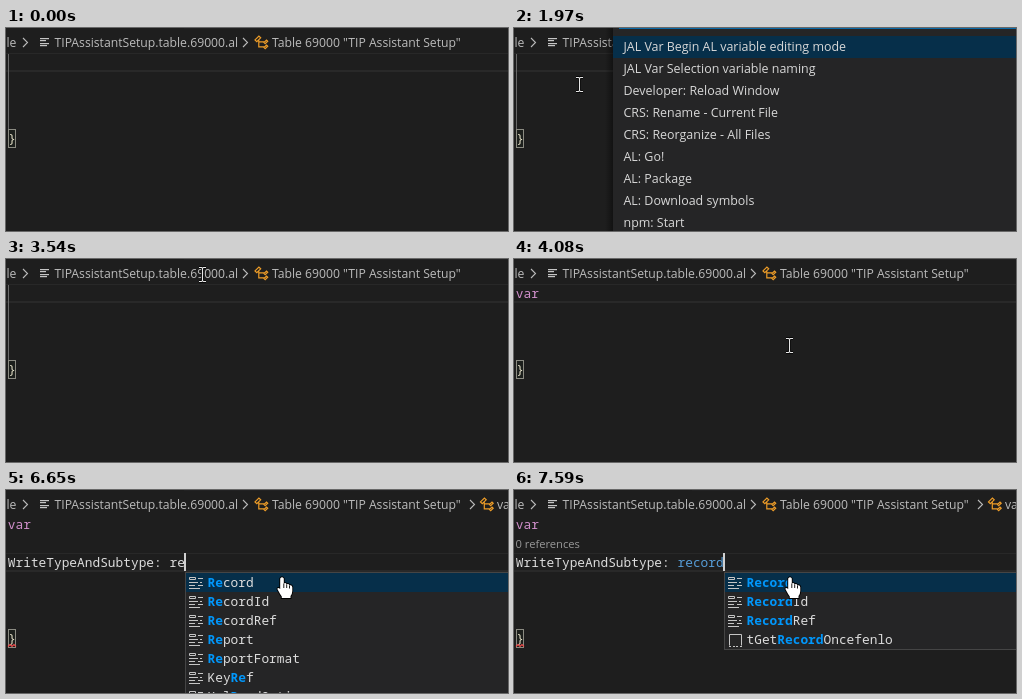
An HTML page with a canvas that plays this animation: 502x203 px, repeating every 8 s.

```html
<!DOCTYPE html>
<html lang="en">
<head>
<meta charset="utf-8">
<title>Editor: declaring a variable</title>
<style>
  html, body { margin: 0; width: 502px; height: 203px; overflow: hidden; background: #1e1e1e; }
  canvas { display: block; }
</style>
</head>
<body>
<canvas id="stage" width="502" height="203"></canvas>
<script>
const W = 502, H = 203, LOOP = 8000;
const ctx = document.getElementById('stage').getContext('2d');

const UI = '"Open Sans", "Noto Sans", sans-serif';
const CODE = '12.83px "Noto Sans Mono", "DejaVu Sans Mono", monospace';
const CHAR = 7.7, LEFT = 1.8, ROW = 19, TOP = 25;

const COMMANDS = [
  'JAL Var Begin AL variable editing mode', 'JAL Var Selection variable naming',
  'Developer: Reload Window', 'CRS: Rename - Current File',
  'CRS: Reorganize - All Files', 'AL: Go!', 'AL: Package',
  'AL: Download symbols', 'npm: Start'
];

// Matched letters stand in brackets, * marks a snippet.
const SUGGEST = {
  re: ['[Re]cord', '[Re]cordId', '[Re]cordRef', '[Re]port', '[Re]portFormat', 'Key[Re]f', 'Xml[Re]adOptions'],
  rec: ['[Rec]ord', '[Rec]ordId', '[Rec]ordRef', '*tGet[Rec]ordOncefenlo', 'XmlP[r]oc[e]ssingInstru[c]tion'],
  reco: ['[Reco]rd', '[Reco]rdId', '[Reco]rdRef', '*tGet[Reco]rdOncefenlo', 'XmlP[r]oc[e]ssingInstru[c]ti[o]n'],
  recor: ['[Recor]d', '[Recor]dId', '[Recor]dRef', '*tGet[Recor]dOncefenlo'],
  record: ['[Record]', '[Record]Id', '[Record]Ref', '*tGet[Record]Oncefenlo']
};

// Pointer path: time, x, y
const PATH = [
  [490, 230, -10], [760, 150, 60], [960, 90, 74], [1230, 29, 48], [1730, 29, 48],
  [2200, 118, 70], [2370, 288, 52], [2530, 210, 9], [2750, 210, 9],
  [2960, 203, 18], [3130, 203, 18], [3290, 197, 16], [3760, 197, 16], [4000, 276, 87]
];

const TYPED = [[6490, 'r'], [6570, 're'], [6950, 'rec'], [7200, 'reco'], [7370, 'recor'], [7590, 'record']];
const POPUP = [[6650, 're'], [7030, 'rec'], [7200, 'reco'], [7370, 'recor'], [7590, 'record']];
const CARET_FLIPS = [500, 1030, 1560, 3470, 3620, 4080, 4630, 5650, 6110];

const latest = (steps, t) => steps.reduce((v, [at, s]) => t >= at ? s : v, '');
const rowY = i => TOP + i * ROW;

function text(s, x, y, color, font) {
  ctx.font = font;
  ctx.fillStyle = color;
  ctx.fillText(s, x, y);
}

function rect(x, y, w, h, color) {
  ctx.fillStyle = color;
  ctx.fillRect(x, y, w, h);
}

function stroke(d, x, y, color, width) {
  ctx.save();
  ctx.translate(x, y);
  ctx.strokeStyle = color;
  ctx.lineWidth = width;
  ctx.stroke(new Path2D(d));
  ctx.restore();
}

const chevron = x => stroke('M0 0 L4.5 4.5 L0 9', x, 10, '#bababa', 1.1);

function classIcon(x) {
  stroke('M1.5 5.4 L5.4 1.5 L7.2 3.3 L3.3 7.2 Z M5.3 5.8 V12.3 H10.7 M5.3 7.3 H10.7' +
    'M10.5 8 L13 5.6 L14.2 6.8 L11.7 9.2 Z M10.5 13 L13 10.6 L14.2 11.8 L11.7 14.2 Z',
    x, 6.5, '#ee9d28', 1.2);
}

function breadcrumbs(t) {
  const font = '12.2px ' + UI, gray = '#bcbcbc';
  rect(178, 0, W - 178, 1, '#222223');
  text('le', 0.5, 19, gray, font);
  chevron(17);
  [[10, 9], [12, 6], [15, 9], [17, 7]].forEach(([y, w]) => rect(34, y, w, 1.2, '#c5c5c5'));
  text('TIPAssistantSetup.table.69000.al', 48.5, 19, gray, font);
  chevron(237);
  classIcon(247.5);
  text('Table 69000 "TIP Assistant Setup"', 266, 19, gray, font);
  if (t >= 4480) {
    chevron(464);
    classIcon(473);
    text('var', 491, 19, gray, font);
  }
}

function brace(y, error) {
  rect(2, y + 1, 8, 18, 'rgba(0,60,0,.06)');
  ctx.strokeStyle = '#8b8b82';
  ctx.lineWidth = 1;
  ctx.strokeRect(2.5, y + 0.5, 7, 18);
  text('}', LEFT + 0.4, y + 14, '#e0dcc4', CODE);
  if (error) stroke('M0 2 L2 0 L4 2 L6 0 L8 2', 2, y + 15.5, '#f14c4c', 1.1);
}

function editor(t) {
  const line = t < 5090 ? 0 : t < 5420 ? 1 : 2;
  const y = rowY(line);
  const typed = latest(TYPED, t);
  let column = 0;

  rect(0, y, W, 1, '#282828');
  rect(0, y + ROW - 2, W, 2, '#292929');
  if (t < 3620) rect(2, TOP + 1, 1, 75, '#6a6a6a');
  else {
    text('var', LEFT, TOP + 14, '#d08fcb', CODE);
    if (!line) column = 3;
  }
  if (t >= 5170) {
    text('WriteTypeAndSubtype:', LEFT, y + 14, '#dcdcdc', CODE);
    column = 21 + typed.length;
    text(typed, LEFT + 21 * CHAR, y + 14, typed === 'record' ? '#569cd6' : '#dcdcdc', CODE);
  }
  if (t >= 6880) text('0 references', 1.5, 58, '#999', '11.2px ' + UI);
  brace(rowY(4 + line), t >= 6190);

  const palette = t >= 1960 && t < 3470;
  const on = CARET_FLIPS.filter(f => t >= f).length % 2;
  const caret = LEFT + column * CHAR;
  if (on && !palette) rect(Math.max(2, Math.floor(caret)), y, 2, ROW - 1, '#d0d0d0');
  return caret;
}

function palette() {
  const shade = ctx.createLinearGradient(91, 0, 99, 0);
  shade.addColorStop(0, 'rgba(0,0,0,0)');
  shade.addColorStop(1, 'rgba(0,0,0,.4)');
  rect(91, 0, 8, H, shade);
  rect(99, 0, W - 99, H, '#252526');
  rect(105, 0, W - 105, 1, '#0a6aa8');
  rect(99, 8, W - 99, 22, '#062f4a');
  COMMANDS.forEach((s, i) => text(s, 109.5, 23 + 22 * i, '#d8d8d8', '12.45px ' + UI));
}

function itemIcon(x, y, snippet) {
  if (snippet) {
    stroke('M2.5 13.5 V2.5 H14.5 V13.5 M2 14.5 H4 M6 14.5 H8 M9 14.5 H11 M13 14.5 H15', x, y, '#c5c5c5', 1);
    return;
  }
  [[10, 3, 5], [1, 7, 9], [12, 7, 2], [1, 10, 6], [10, 10, 5], [1, 13, 11]]
    .forEach(([dx, dy, w]) => rect(x + dx, y + dy, w, 1, '#c5c5c5'));
  stroke('M1.5 2.5 H7.5 V4.5 H1.5 Z', x, y, '#c5c5c5', 1);
}

function suggestions(items, caret) {
  const x = Math.round(caret + 1.2), y = 83, h = items.length * ROW;
  rect(x - 1, y - 1, W - x + 1, h + 2, '#454545');
  rect(x, y, W - x, h, '#252526');
  rect(x, y, W - x, ROW, '#062f4a');
  items.forEach((item, i) => {
    const top = y + i * ROW, snippet = item[0] === '*';
    let at = x + 21.5;
    itemIcon(x + 2, top + 2, snippet);
    item.replace('*', '').split(/[\[\]]/).forEach((part, k) => {
      text(part, at, top + 14, k % 2 ? '#0097fb' : '#dcdcdc', (k % 2 ? 'bold ' : '') + CODE);
      at += part.length * CHAR;
    });
  });
}

function pointerAt(t) {
  const next = PATH.findIndex(p => p[0] > t);
  if (next < 0) return PATH[PATH.length - 1].slice(1);
  if (!next) return null;
  const [t0, x0, y0] = PATH[next - 1], [t1, x1, y1] = PATH[next];
  const k = (t - t0) / (t1 - t0);
  return [x0 + (x1 - x0) * k, y0 + (y1 - y0) * k];
}

function hand(x, y) {
  ctx.save();
  ctx.translate(x, y);
  const shape = new Path2D('M-1.8 1.5 Q0 -1.2 1.8 1.5 V6.5 Q3.6 5.3 4.6 7.2 Q6.6 6.2 7.5 8.3' +
    'Q10 7.6 10.3 10.2 V14 Q10.2 17 8.5 19 V21 H-.2 V19.5 Q-1.8 17.5 -3 15 L-4.6 12' +
    'Q-4.4 9.8 -1.8 12 Z');
  ctx.lineWidth = 1.8;
  ctx.strokeStyle = '#000';
  ctx.stroke(shape);
  ctx.fillStyle = '#fff';
  ctx.fill(shape);
  ctx.lineWidth = 0.9;
  ctx.stroke(new Path2D('M1.8 6.5 V11 M4.7 7.3 V11 M7.5 8.4 V11.5'));
  ctx.restore();
}

function beam(x, y) {
  const d = 'M-3.5 -7 H-1 L0 -6.3 L1 -7 H3.5 M0 -6.3 V6.3 M-3.5 7 H-1 L0 6.3 L1 7 H3.5';
  const px = Math.round(x) - 0.5, py = Math.round(y) - 0.5;
  stroke(d, px, py, '#000', 2.6);
  stroke(d, px, py, '#e8e8e8', 1.1);
}

function draw(t) {
  rect(0, 0, W, H, '#1e1e1e');
  breadcrumbs(t);
  const caret = editor(t);
  const open = t >= 1960 && t < 3470;
  if (open) palette();
  const key = latest(POPUP, t);
  if (key) suggestions(SUGGEST[key], key === 're' ? LEFT + 23 * CHAR : caret);

  // The pointer is sampled about thirteen times a second.
  const pos = pointerAt(Math.floor(t / 77) * 77);
  if (!pos) return;
  const overList = key || (open && pos[0] > 99);
  (overList ? hand : beam)(...pos);
}

function tick() {
  draw(performance.now() % LOOP);
  requestAnimationFrame(tick);
}
tick();
</script>
</body>
</html>
```
